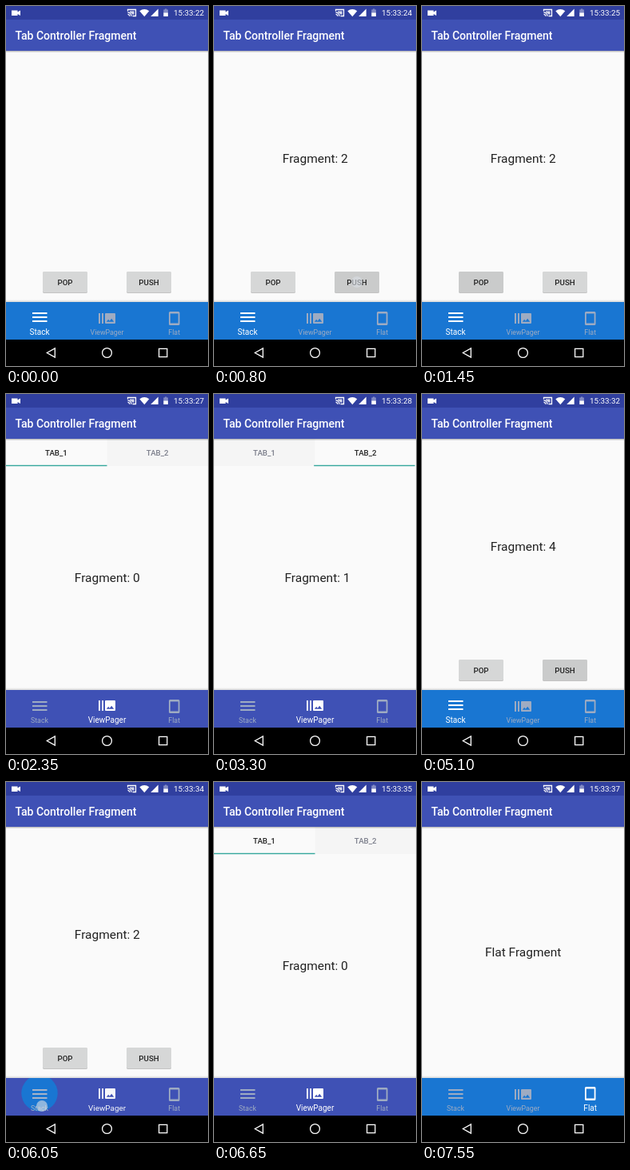
Write an HTML page that moves like this. It is 253 px wide and 450 px high and loops after 7600 ms.

```html
<!DOCTYPE html>
<html lang="en">
<head>
<meta charset="utf-8">
<title>Tab Controller Fragment</title>
<style>
  html, body { margin: 0; width: 100%; height: 100%; overflow: hidden; background: #fafafa; }
  svg { display: block; width: 253px; height: 450px; font-family: Roboto, sans-serif; }
  .mid { text-anchor: middle; }
  .bold { font-weight: 500; font-size: 9.7px; }
  .body { font-size: 15.46px; fill: #212121; text-anchor: middle; }
  .tab { fill: currentColor; }
  .line { fill: none; stroke: #fff; stroke-width: 1.3; }
</style>
</head>
<body>
<svg viewBox="0 0 253 450">
  <defs>
    <linearGradient id="down" x2="0" y2="1">
      <stop stop-opacity=".28"/><stop offset="1" stop-opacity="0"/>
    </linearGradient>
    <linearGradient id="up" x2="0" y2="1">
      <stop stop-opacity="0"/><stop offset="1" stop-opacity=".14"/>
    </linearGradient>
    <clipPath id="barClip"><rect y="370" width="253" height="47"/></clipPath>
  </defs>
  <rect width="253" height="450" fill="#fafafa"/>

  <g id="stack">
    <text id="count" class="body" x="126.8" y="195.5"></text>
    <g id="buttons"></g>
  </g>

  <g id="pager">
    <rect id="shade" y="56" width="126.5" height="34" fill="#f5f5f5"/>
    <text id="tab1" class="mid bold" x="63" y="76.8">TAB_1</text>
    <text id="tab2" class="mid bold" x="189.7" y="76.8">TAB_2</text>
    <rect id="mark" y="88.8" width="126.5" height="1.4" fill="#35a79c"/>
    <g id="pages">
      <text class="body" x="126.8" y="235">Fragment: 0</text>
      <text class="body" x="379.8" y="235">Fragment: 1</text>
    </g>
  </g>

  <text id="flat" class="body" x="126.6" y="218">Flat Fragment</text>

  <rect width="253" height="17" fill="#303f9f"/>
  <rect y="17" width="253" height="39" fill="#3f51b5"/>
  <rect y="56" width="253" height="2.5" fill="url(#down)"/>
  <text x="11.5" y="42" font-size="14.05" font-weight="500" fill="#fff">Tab Controller Fragment</text>

  <g fill="#fff">
    <path d="M7 5.5h7.5v2l3.5-2v6.5l-3.5-2v2H7z"/>
    <path class="line" stroke-width="1" d="M152.5 6.5v-2h10v8h-4M152.5 8a4.5 4.5 0 0 1 4.5 4.7M152.5 10.3a2.3 2.3 0 0 1 2.3 2.4"/>
    <path d="M155 6.5h5.5v4h-2.2q-.8-2-3.3-2.6z" opacity=".8"/>
    <path d="M167.3 6.2q6-4.4 12 0l-6 7z"/>
    <path d="M190.7 3.5v9.5h-9.5z"/>
    <path d="M197.3 4.4h1.6V3.4h2.4v1h1.6V9h-5.6z" opacity=".4"/>
    <path d="M197.3 8.5h5.6V13h-5.6z"/>
    <text id="clock" x="248" y="12" font-size="9.84" text-anchor="end"></text>
  </g>

  <rect y="367" width="253" height="3" fill="url(#up)"/>
  <g clip-path="url(#barClip)">
    <rect id="bar" y="370" width="253" height="47"/>
    <circle id="reveal" cy="389"/>
  </g>
  <g class="tab">
    <path d="M33 384h18.5v2H33zM33 389h18.5v2H33zM33 394h18.5v2H33z"/>
    <text class="mid" x="42">Stack</text>
  </g>
  <g class="tab">
    <path fill-rule="evenodd" d="M116 384h2v13h-2zM120 384h2v13h-2zM125 384h11q1 0 1 1v11q0 1-1 1h-11q-1 0-1-1v-11q0-1 1-1zM125.8 394.7h9.4l-3-4-2.4 3-1.6-2z"/>
    <text class="mid" x="126.5">ViewPager</text>
  </g>
  <g class="tab">
    <path fill-rule="evenodd" d="M205.5 382h10.5q1.5 0 1.5 1.5v14q0 1.5-1.5 1.5h-10.5q-1.5 0-1.5-1.5v-14q0-1.5 1.5-1.5zM205.8 384.5v12h9.9v-12z"/>
    <text class="mid" x="210.7">Flat</text>
  </g>

  <rect y="417" width="253" height="33"/>
  <g class="line">
    <path d="M51.3 433.5l10-5.6v11.2z"/>
    <circle cx="126.5" cy="433.5" r="5.9"/>
    <rect x="191.6" y="428.4" width="10.2" height="10.2"/>
  </g>
  <circle id="touch" r="7" fill="#d8dde4" opacity=".62"/>
</svg>
<script>
const LOOP = 7600, REVEAL = 160;
const $ = id => document.getElementById(id);
const set = (el, attrs) => { for (const k in attrs) el.setAttribute(k, attrs[k]); };
const clamp = x => Math.max(0, Math.min(1, x));
const ease = x => (1 - Math.cos(Math.PI * clamp(x))) / 2;
const mix = (a, b, k) => `rgb(${a.map((v, i) => Math.round(v + (b[i] - v) * k))})`;

const views = ['stack', 'pager', 'flat'];
const centers = [42, 126.5, 210.7];
const colors = ['#1976d2', '#3f51b5', '#1976d2'];
const tabs = [...document.querySelectorAll('.tab')];

const taps = [
  [540, 'push'], [790, 'push'], [1040, 'push'], [1380, 'pop'],
  [1930, 'pager'], [3720, 'flat'], [4385, 'stack'],
  [4850, 'push'], [5050, 'push'], [5300, 'pop'], [5490, 'pop'],
  [5700, 'pager'], [6020, 'stack'], [6450, 'pager'], [6800, 'flat']
];
const spots = { pop: [74, 345], push: [179, 345], stack: [45, 405], pager: [128, 402], flat: [211, 402] };

$('buttons').innerHTML = ['pop', 'push'].map(id => {
  const x = spots[id][0] - 28;
  const box = (y, rest) => `<rect x="${x}" y="${y}" width="56" height="26" rx="1.4" ${rest}/>`;
  return box(333, 'opacity=".22"') + box(332, 'fill="#d6d7d7"') + box(332, `id="${id}" opacity="0"`) +
    `<text class="mid bold" fill="#212121" x="${x + 28}" y="348.6">${id.toUpperCase()}</text>`;
}).join('');

function drawTabs(from, to, k) {
  set($('bar'), { fill: colors[from] });
  set($('reveal'), { cx: centers[to], r: k * 253, fill: colors[to] });
  tabs.forEach((tab, i) => {
    const on = from === to ? +(i === to) : i === to ? k : i === from ? 1 - k : 0;
    tab.style.color = mix([158, 171, 194], [255, 255, 255], on);
    set(tab.children[0], { transform: `translate(0 ${-on})` });
    set(tab.children[1], { 'font-size': 8.8 + 1.2 * on, y: 411.3 - 0.3 * on });
  });
}

function draw(t) {
  let view = 0, last = 0, since = -LOOP, count = 0, finger = null;
  const press = { pop: 0, push: 0 };
  for (const [at, what] of taps) {
    const d = t - at;
    if (d > -60 && d < 40) finger = spots[what];
    if (what in press && d > -60 && d < 200)
      press[what] = Math.max(press[what], Math.min(1, (d + 60) / 40, (200 - d) / 120));
    if (d < 0) continue;
    if (what === 'push') count++;
    else if (what === 'pop') count--;
    else { last = view; view = views.indexOf(what); since = at; }
  }

  views.forEach((id, i) => set($(id), { display: i === view ? 'inline' : 'none' }));
  $('count').textContent = count ? 'Fragment: ' + count : '';
  for (const id in press) set($(id), { opacity: press[id] * 0.055 });

  const page = ease((t - 2530) / 620) - ease((t - 3280) / 320);
  set($('pages'), { transform: `translate(${-253 * page} 0)` });
  set($('mark'), { x: 126.5 * page });
  set($('shade'), { x: page < 0.5 ? 126.5 : 0 });
  set($('tab1'), { fill: mix([33, 33, 33], [122, 125, 138], page) });
  set($('tab2'), { fill: mix([122, 125, 138], [33, 33, 33], page) });

  const k = ease((t - since) / REVEAL);
  drawTabs(k < 1 ? last : view, view, k);

  $('clock').textContent = '15:33:' + (23 + Math.floor((t - 230) / 520));
  set($('touch'), { display: finger ? 'inline' : 'none' });
  if (finger) set($('touch'), { cx: finger[0], cy: finger[1] });
}

function tick() {
  draw(performance.now() % LOOP);
  requestAnimationFrame(tick);
}
tick();
</script>
</body>
</html>
```
